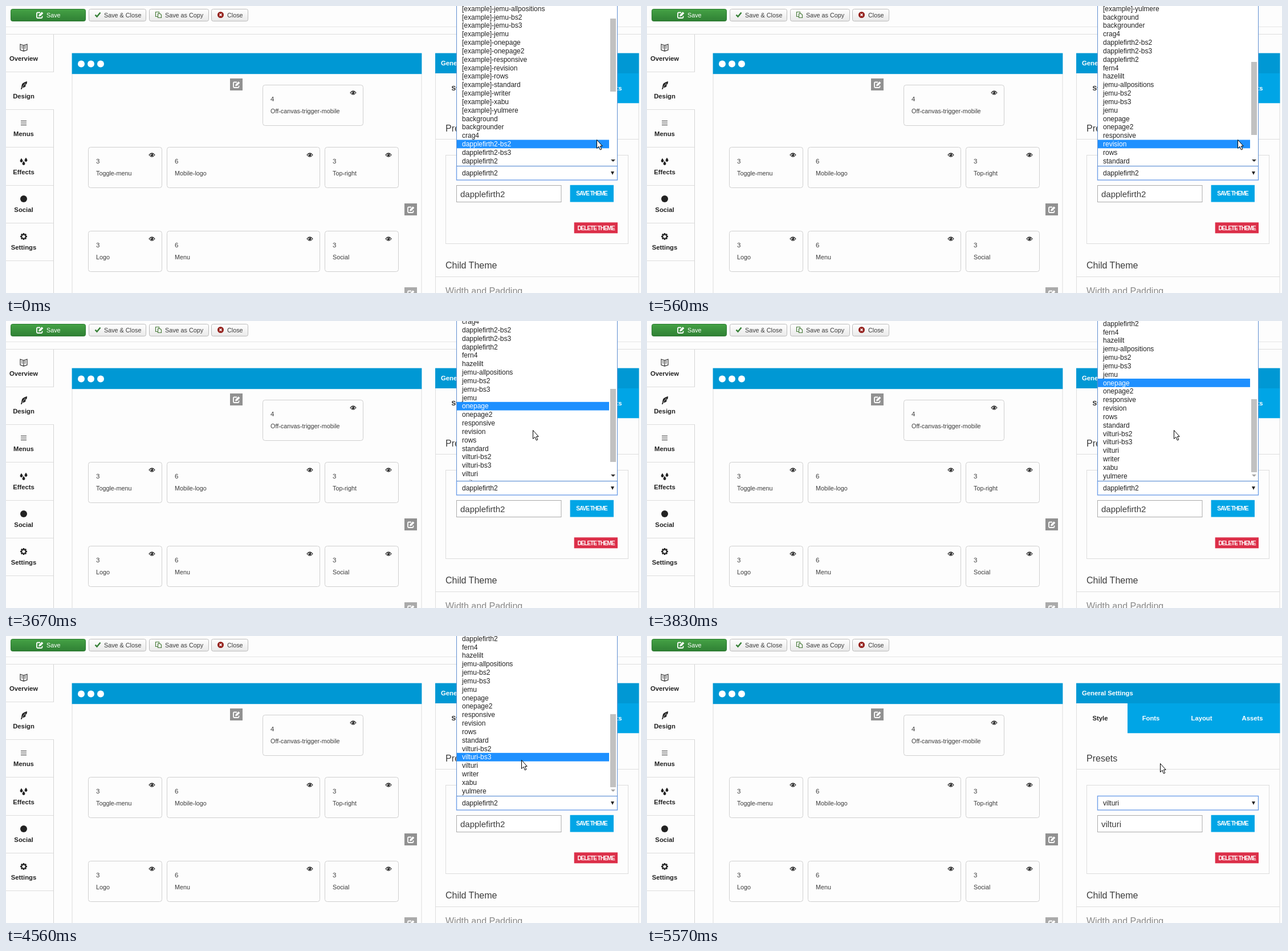
Recreate the animation shown at these times as an HTML page. Size 1114 by 503 pixels, loop 8000 ms.

```html
<!DOCTYPE html>
<html lang="en">
<head>
<meta charset="utf-8">
<title>Theme picker</title>
<style>
  html, body { margin: 0; width: 100%; height: 100%; overflow: hidden; background: #fdfdfd; }
  svg { display: block; width: 1114px; height: 503px; }
  text { font: 10.8px "Liberation Sans", Arial, sans-serif; fill: #3c3c3c; white-space: pre; }
  .bold { font-size: 11.3px; font-weight: 700; fill: #222; }
  .mid { text-anchor: middle; }
  .white { fill: #fff; }
  .head { font-size: 16px; }
  .opt { font-size: 12px; fill: #222; }
  .field { font-size: 15px; }
  .caps { font-size: 10px; font-weight: 700; letter-spacing: -1px; fill: #fff; }
  .line { fill: none; stroke: #ddd; }
  .stroke { fill: none; stroke: #333; stroke-width: 1.2; }
</style>
</head>
<body>
<svg viewBox="0 0 1114 503" xmlns="http://www.w3.org/2000/svg">
  <defs>
    <linearGradient id="green" x2="0" y2="1"><stop stop-color="#45a245"/><stop offset="1" stop-color="#2f8034"/></linearGradient>
    <linearGradient id="grey" x2="0" y2="1"><stop stop-color="#fff"/><stop offset="1" stop-color="#e9e9e9"/></linearGradient>
    <clipPath id="view"><rect x="791" y="0" width="281" height="280"/></clipPath>
    <g id="edit" fill="none" stroke="#fff" stroke-width="1.8">
      <path d="M7 1.5H2.5Q1 1.5 1 3V9.5Q1 11 2.5 11H9Q10.500 11 10.500 9.500V7.500"/>
      <path d="M4 8.500 4.700 5.500 9.800.2 12.400 2.800 7.200 8Z" fill="#fff" stroke="none"/>
    </g>
    <g id="eye">
      <path d="M-5 0Q0-6.400 5 0Q0 6.400-5 0Z" fill="none" stroke="#222" stroke-width="1.200"/>
      <circle r="2.300" fill="#222"/><circle cx="-.7" cy="-.8" r=".7" fill="#fff"/>
    </g>
  </defs>
  <g id="page"></g>
  <g id="list">
    <path d="M790.500-2V280.500H1072.500V-2Z" fill="#fff" stroke="#5f8fd0"/>
    <g clip-path="url(#view)">
      <rect id="hover" x="791" width="267" height="14.8" fill="#1e90ff"/>
      <g id="opts"></g>
    </g>
    <rect id="bar" x="1060" width="10" height="128" fill="#c1c1c1"/>
    <path id="down" d="M1061 269H1069L1065 273Z"/>
  </g>
  <path id="cursor" d="M.5.500V15.500L4 12.300 6.300 18 8.800 17 6.400 11.400H10.200Z" fill="#fff" stroke="#000" stroke-linejoin="round"/>
</svg>
<script>
const $ = id => document.getElementById(id);
const rect = (x, y, w, h, attrs = '') => `<rect x="${x}" y="${y}" width="${w}" height="${h}" ${attrs}/>`;
const text = (x, y, s, cls = '', attrs = '') => `<text x="${x}" y="${y}" class="${cls}" ${attrs}>${s}</text>`;
const line = (d, attrs = '') => `<path class="line" d="${d}" ${attrs}/>`;
const use = (id, x, y) => `<use href="#${id}" x="${x}" y="${y}"/>`;
const at = (x, y, body) => `<g transform="translate(${x} ${y})">${body}</g>`;

const BLUE = '#0098d4', SKY = '#00a5e6';

function toolbar() {
  const plain = (x, w, label, tx) =>
    rect(x + .5, 5.5, w - 1, 21, 'rx="3" fill="url(#grey)" stroke="#bbb"') + text(tx, 20, label);
  return rect(8.5, 5.5, 131, 21, 'rx="3" fill="url(#green)" stroke="#2c7a31"') +
    use('edit', 53, 10) + text(71, 20, 'Save', 'white') +
    plain(145, 101, 'Save &amp; Close', 172) +
    '<path d="M156.500 15.500 159.500 18.700 165.500 11.500" fill="none" stroke="#378137" stroke-width="2.500"/>' +
    plain(251, 105, 'Save as Copy', 279) +
    '<path d="M266.500 18.500H262.500V10.500H268.500V13M266.500 13.500H270.500L272.500 15.500V20.500H266.500Z" fill="none" stroke="#4b7d3c" stroke-width="1.200"/>' +
    plain(360, 65, 'Close', 388) +
    '<circle cx="376.500" cy="15.500" r="5.500" fill="#94201c"/><path d="M374.500 13.500l4 4m0-4l-4 4" stroke="#fff" stroke-width="1.500"/>' +
    line('M0 36.500H1114', 'stroke-opacity=".7"') + line('M0 49.500H1114');
}

function sidebar() {
  const drop = (x, y, k) =>
    `<path transform="translate(${x} ${y}) scale(${k})" d="M0-4Q3 0 3 2A3 3 0 0 1-3 2Q-3 0 0-4Z" fill="#222"/>`;
  const teeth = [0, 45, 90, 135].map(a => rect(-1.3, -6, 2.6, 12, `transform="rotate(${a})" fill="#222"`)).join('');
  const items = [
    ['Overview', '<path class="stroke" d="M0-4 -6-6V4L0 6 6 4V-6ZM0-4V6M-4-2.800l2.500.8M-4 0l2.500.8M4-2.800l-2.500.8M4 0l-2.500.8"/>'],
    ['Design', '<path d="M6-7Q-4-5-4 3L-5 7 -3.500 7 -2 4Q3 4 4 0L2-.5 5-2Q6-4 6-7Z" fill="#222"/><path d="M-3 4 3-4" stroke="#fdfdfd" stroke-width=".7"/>'],
    ['Menus', '<path class="stroke" d="M-5-3.500H5M-5 0H5M-5 3.500H5"/>'],
    ['Effects', drop(-4, -2, .8) + drop(4, -3, .8) + drop(0, 3, .8)],
    ['Social', '<circle r="6" fill="#222"/>'],
    ['Settings', teeth + '<circle r="4.500" fill="#222"/><circle r="2.600" fill="#fdfdfd"/>']
  ];
  return items.map(([name, icon], i) => {
    const y = 50 + Math.round(i * 66.2);
    return at(31, y + 23, icon) + text(31, y + 46, name, 'bold mid') + line(`M0 ${y + 65.5}H84`);
  }).join('') + line('M83.500 50V115.500M83.500 181.500V503', 'style="stroke:#d4d4d4"');
}

function layout() {
  const box = (x, y, w, n, name) =>
    rect(x + .5, y + .5, w - 1, 71, 'rx="4" fill="#fdfdfd" stroke="#cfcfcf"') +
    text(x + 14, y + 29, n, '', 'style="font-size:11.5px"') + text(x + 14, y + 50, name) +
    use('eye', x + w - 18, y + 14);
  const row = (y, names) =>
    box(144, y, 130, 3, names[0]) + box(282, y, 269, 6, names[1]) + box(559, y, 130, 3, names[2]);
  const edit = (x, y, fill = '#919191') => rect(x, y, 22, 21, `fill="${fill}"`) + use('edit', x + 5, y + 5);
  return line('M116 119V503M729 119V503') + rect(115.6, 82.6, 613.8, 36.6, `fill="${BLUE}"`) +
    [132, 149, 166].map(x => `<circle cx="${x}" cy="101.500" r="6" fill="#fff"/>`).join('') +
    edit(393, 127) + box(450, 138, 177, 4, 'Off-canvas-trigger-mobile') +
    row(247, ['Toggle-menu', 'Mobile-logo', 'Top-right']) + edit(699, 346) +
    row(394, ['Logo', 'Menu', 'Social']) + edit(699, 493, '#aaa');
}

function settings() {
  return line('M753.500 118V503M1110 118V503M754 233.500H1110M754 474.500H1110') +
    rect(753, 82.6, 357.5, 35.4, `fill="${BLUE}"`) + text(763, 104, 'General Settings', 'bold white') +
    rect(843, 118, 267.5, 52.3, `fill="${SKY}"`) +
    ['Style', 'Fonts', 'Layout', 'Assets'].map((s, i) =>
      text(795 + i * 89, 148, s, 'bold mid' + (i ? ' white' : ''))).join('') +
    text(771, 219.5, 'Presets', 'head') + rect(771.5, 261.5, 320, 155, 'class="line"') +
    rect(790.5, 280.5, 282, 24.5, 'fill="#fff" stroke="#6f9fe8" stroke-width="1.4"') +
    text(800, 297, '', 'opt', 'id="picked"') + '<path d="M1061 290H1067L1064 296Z" fill="#222"/>' +
    rect(790.5, 314.5, 183.5, 29, 'fill="#fff" stroke="#aaa"') + text(797, 335, '', 'field', 'id="name"') +
    rect(989.6, 313.8, 76.4, 29.7, `fill="${SKY}"`) + text(1027.5, 332, 'SAVE THEME', 'caps mid') +
    rect(996.7, 379.3, 76.3, 19, 'fill="#dc2f49"') + text(1035, 392.5, 'DELETE THEME', 'caps mid') +
    text(771, 460, 'Child Theme', 'head') +
    text(771, 505, 'Width and Padding', 'head', 'style="fill:#888"');
}

$('page').innerHTML = toolbar() + sidebar() + layout() + settings();

const BEFORE = 'dapplefirth2', AFTER = 'vilturi';
const family = n => [n + '-bs2', n + '-bs3', n];
const jemu = ['jemu-allpositions', ...family('jemu')];
const pages = ['onepage', 'onepage2', 'responsive', 'revision', 'rows', 'standard'];
const tail = ['writer', 'xabu', 'yulmere'];
const options = [
  ...[...jemu, ...pages, ...tail].map(n => '[example]-' + n),
  'background', 'backgrounder', 'crag4', ...family(BEFORE), 'fern4', 'hazelilt',
  ...jemu, ...pages, ...family(AFTER), ...tail
];
$('opts').innerHTML = options.map(s => text(800, 0, s, 'opt')).join('');
const rows = [...$('opts').children];

// start ms, rows scrolled, scrollbar top, hovered option, cursor x, cursor y
const steps = [
  [0, 0, 22, 16, 1036, 234],
  [280, 4, 22, 16, 1036, 234],
  [430, 8, 60, 16, 1036, 234],
  [560, 12, 98, 28, 1036, 234],
  [3240, 12, 98, 25, 929, 194],
  [3400, 12, 98, 25, 924, 191],
  [3670, 15.25, 119, 25, 924, 191],
  [3830, 18, 137, 25, 924, 191],
  [3980, 18, 137, 31, 924, 191],
  [4290, 18, 137, 31, 916, 202],
  [4410, 18, 137, 32, 909, 212],
  [4560, 18, 137, 32, 904, 217],
  [4710, 18, 137, 33, 904, 220],
  [4850, 18, 137, 33, 899, 224],
  [5260, 18, 137, 33, 900, 223]
];
const LOOP = 8000, CLOSE = 5570, PITCH = 14.833, END = 18;

function draw(t) {
  const [, scroll, bar, hover, x, y] = steps.findLast(s => s[0] <= t);
  const open = t < CLOSE, theme = open ? BEFORE : AFTER;
  const top = i => (i - scroll) * PITCH - 2.8;
  rows.forEach((row, i) => {
    row.setAttribute('y', top(i) + 11.6);
    row.style.fill = i === hover ? '#fff' : '';
  });
  $('hover').setAttribute('y', top(hover));
  $('bar').setAttribute('y', bar);
  $('down').setAttribute('fill', scroll < END ? '#333' : '#a3a3a3');
  $('list').style.display = open ? '' : 'none';
  $('picked').textContent = $('name').textContent = theme;
  $('cursor').setAttribute('transform', `translate(${x} ${y})`);
}

function tick() {
  draw(performance.now() % LOOP);
  requestAnimationFrame(tick);
}
tick();
</script>
</body>
</html>
```
